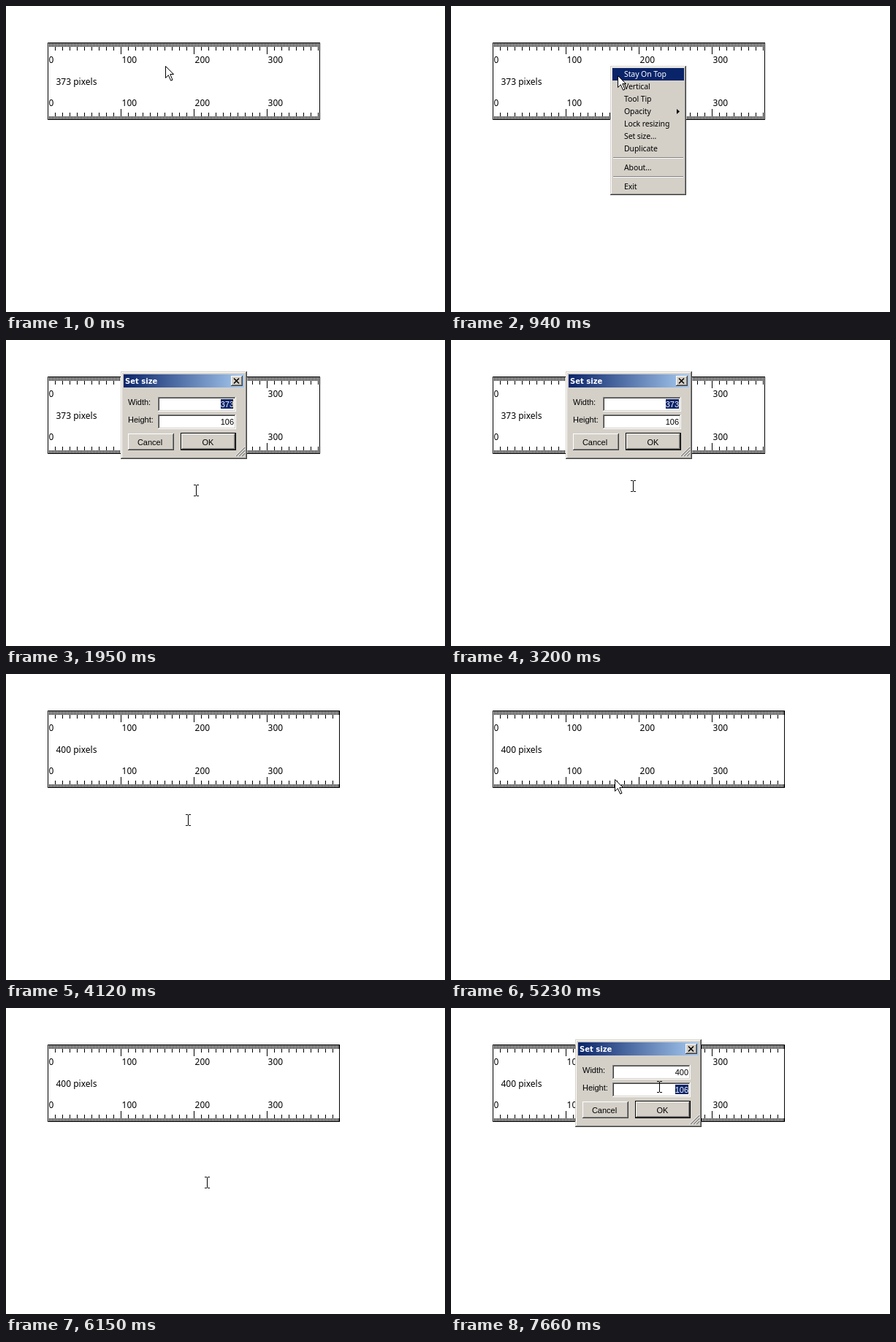
Write an HTML page that moves like this. It is 601 px wide and 419 px high and loops after 8000 ms.

```html
<!DOCTYPE html>
<html lang="en">
<head>
<meta charset="utf-8">
<title>Pixel ruler</title>
<style>
  html, body { margin: 0; width: 100%; height: 100%; overflow: hidden; background: #fff; }
  svg { display: block; white-space: pre; }
  .ruler { font: 12px "Noto Sans", "Open Sans", sans-serif; }
  .menu { font: 10.5px "Noto Sans", "Open Sans", sans-serif; letter-spacing: -.1px; }
  .dialog { font: 11px "Liberation Sans", Arial, sans-serif; }
  .title { font: bold 10px "DejaVu Sans", sans-serif; }
  .crisp { shape-rendering: crispEdges; }
</style>
</head>
<body>
<svg id="stage" width="601" height="419" viewBox="0 0 601 419">
  <defs>
    <linearGradient id="caption">
      <stop offset="0" stop-color="#0a246a"/>
      <stop offset="1" stop-color="#a6caf0"/>
    </linearGradient>
  </defs>
  <g id="scene"></g>
</svg>
<script>
const LOOP = 8000;
const FACE = '#d4d0c8', SHADOW = '#808080', DARK = '#404040', NAVY = '#0a246a', WHITE = '#fff', BLACK = '#000';
const ITEMS = ['Stay On Top', 'Vertical', 'Tool Tip', 'Opacity', 'Lock resizing', 'Set size…', 'Duplicate',
  '-', 'About…', '-', 'Exit'];

// Each step changes part of the state and keeps the rest.
const STEPS = [
  [0, { width: 373, cursor: arrow, x: 218, y: 82, menu: null, dialog: null }],
  [550, { menu: [218, 82], hot: -1 }],
  [940, { x: 228, y: 95, hot: 0 }],
  [1065, { x: 250, y: 130, hot: 2 }],
  [1190, { x: 264, y: 167, hot: 4 }],
  [1340, { x: 267, y: 170, hot: 5 }],
  [1480, { x: 269, y: 176 }],
  [1630, { menu: null, dialog: 157, value: '373', focus: 0, selected: true, caret: 154, x: 263, y: 170 }],
  [1790, { cursor: beam, x: 263, y: 182 }],
  [1950, { x: 257, y: 198 }],
  [2090, { x: 246, y: 192, caret: 0 }],
  [2660, { caret: 154 }],
  [3200, { caret: 0 }],
  [3600, { value: '4', selected: false, caret: 154 }],
  [3725, { value: '40' }],
  [3850, { value: '400' }],
  [4120, { dialog: null, width: 400 }],
  [4810, { x: 231, y: 194 }],
  [4960, { cursor: arrow, x: 224, y: 145 }],
  [5100, { y: 143 }],
  [5230, { y: 144 }],
  [5370, { menu: [224, 144], hot: -1 }],
  [5490, { x: 252, y: 174, hot: 1 }],
  [5610, { x: 274, y: 201, hot: 3 }],
  [5760, { x: 275, y: 219, hot: 4 }],
  [5885, { y: 233, hot: 5 }],
  [6010, { y: 238 }],
  [6150, { menu: null, cursor: beam, x: 272, y: 231 }],
  [6270, { dialog: 170, focus: 0, selected: true, caret: 154 }],
  [6550, { x: 274 }],
  [6830, { cursor: arrow, x: 281, y: 150, caret: 0 }],
  [6960, { cursor: beam, x: 282, y: 100 }],
  [7230, { focus: 1, selected: false, caret: 137 }],
  [7380, { selected: true, caret: 154 }],
  [7660, { caret: 0 }],
];

const states = [];
for (const [, change] of STEPS) states.push({ ...states[states.length - 1], ...change });

const rect = (x, y, w, h, fill) => `<rect x="${x}" y="${y}" width="${w}" height="${h}" fill="${fill}"/>`;
const text = (x, y, s, extra = '') => `<text x="${x}" y="${y}" ${extra}>${s}</text>`;
const line = (d, color) => `<path class="crisp" d="${d}" fill="none" stroke="${color}"/>`;
const group = (x, y, name, body) => `<g class="${name}" transform="translate(${x} ${y})">${body}</g>`;

function edge(x, y, w, h, topLeft, bottomRight) {
  return rect(x, y, w, h, bottomRight) + rect(x, y, w - 1, h - 1, topLeft);
}

function box(x, y, w, h, outer, inner, fill) {
  return edge(x, y, w, h, ...outer) + edge(x + 1, y + 1, w - 2, h - 2, ...inner) +
    rect(x + 2, y + 2, w - 4, h - 4, fill);
}

const frame = (w, h) => box(0, 0, w, h, [FACE, DARK], [WHITE, SHADOW], FACE);
const button = (x, y, w, h) => box(x, y, w, h, [WHITE, DARK], [FACE, SHADOW], FACE);

function ruler(width) {
  const height = 106;
  let ticks = '', labels = '';
  for (let i = 0; i < width; i += 2) {
    const size = i % 100 === 0 ? 15 : i % 10 === 0 ? 10 : 5;
    ticks += `M${i + .5} 0v${size + 1}M${i + .5} ${height}v${-size}`;
    if (size === 15) labels += text(i + 1.6, 28, i) + text(i + 1.6, 87, i);
  }
  return group(57, 50, 'ruler',
    line(`M.5 .5H${width - .5}V${height - .5}H.5Z`, BLACK) + line(ticks, BLACK) +
    labels + text(11.5, 58, `${width} pixels`));
}

function menu([x, y], hot) {
  let body = frame(104, 177), top = 3;
  ITEMS.forEach((label, i) => {
    if (label === '-') {
      body += rect(4, top + 3, 96, 1, SHADOW) + rect(4, top + 4, 96, 1, WHITE);
      top += 9;
      return;
    }
    const ink = i === hot ? WHITE : BLACK;
    if (i === hot) body += rect(3, top, 98, 17, NAVY);
    body += text(19, top + 12, label, `fill="${ink}"`);
    if (label === 'Opacity') body += `<path d="M91 ${top + 5}l4 3.5l-4 3.5z" fill="${ink}"/>`;
    top += 17;
  });
  return group(x, y, 'menu', body);
}

function field(top, value, focused, { selected, caret }) {
  const marked = focused && selected;
  return box(51, top, 107, 20, [SHADOW, WHITE], [DARK, FACE], WHITE) +
    (marked ? rect(137, top + 3, 18, 13, NAVY) : '') +
    text(155, top + 14, value, `text-anchor="end" fill="${marked ? WHITE : BLACK}"`) +
    (focused && caret ? rect(caret, top + 3, 1, 13, marked ? '#f5db95' : BLACK) : '');
}

function grip() {
  let body = '';
  for (const size of [4, 8, 12]) {
    body += `<path d="M${170 - size} 116l${size} ${-size}" stroke="${SHADOW}" stroke-width="1.6"/>` +
      `<path d="M${168.7 - size} 116L170 ${114.7 - size}" stroke="${WHITE}" stroke-width=".8"/>`;
  }
  return body;
}

function dialog(s) {
  return group(s.dialog, 43, 'dialog',
    frame(173, 120) +
    rect(4, 4, 165, 18, 'url(#caption)') +
    text(6, 17, 'Set size', `class="title" fill="${WHITE}"`) +
    button(151, 6, 16, 14) +
    `<path d="M155 9.5l7 7m0-7l-7 7" stroke="${BLACK}" stroke-width="1.6"/>` +
    text(10, 46, 'Width:') + field(35, s.value, s.focus === 0, s) +
    text(10, 70, 'Height:') + field(59, '106', s.focus === 1, s) +
    button(10, 85, 63, 23) + text(40, 101, 'Cancel', 'text-anchor="middle"') +
    rect(82, 84, 76, 24, BLACK) + button(83, 85, 74, 22) +
    text(119.5, 101, 'OK', 'text-anchor="middle"') +
    grip());
}

function arrow() {
  return `<path d="M.5 .5V16.5L4.3 12.7 7.7 20.2 10 19.2 6.8 11.5H11.5Z" fill="${WHITE}" stroke="${BLACK}"/>`;
}

function beam() {
  return line('M0 .5h3m1 0h3M3.5 1v14M0 15.5h3m1 0h3', BLACK);
}

const scene = document.getElementById('scene');
let shown = -1;

function draw(time) {
  const index = STEPS.findLastIndex(([start]) => start <= time);
  if (index === shown) return;
  shown = index;
  const s = states[index];
  scene.innerHTML = ruler(s.width) +
    (s.menu ? menu(s.menu, s.hot) : '') +
    (s.dialog ? dialog(s) : '') +
    group(s.x, s.y, 'cursor', s.cursor());
}

function tick() {
  draw(performance.now() % LOOP);
  requestAnimationFrame(tick);
}
tick();
</script>
</body>
</html>
```
